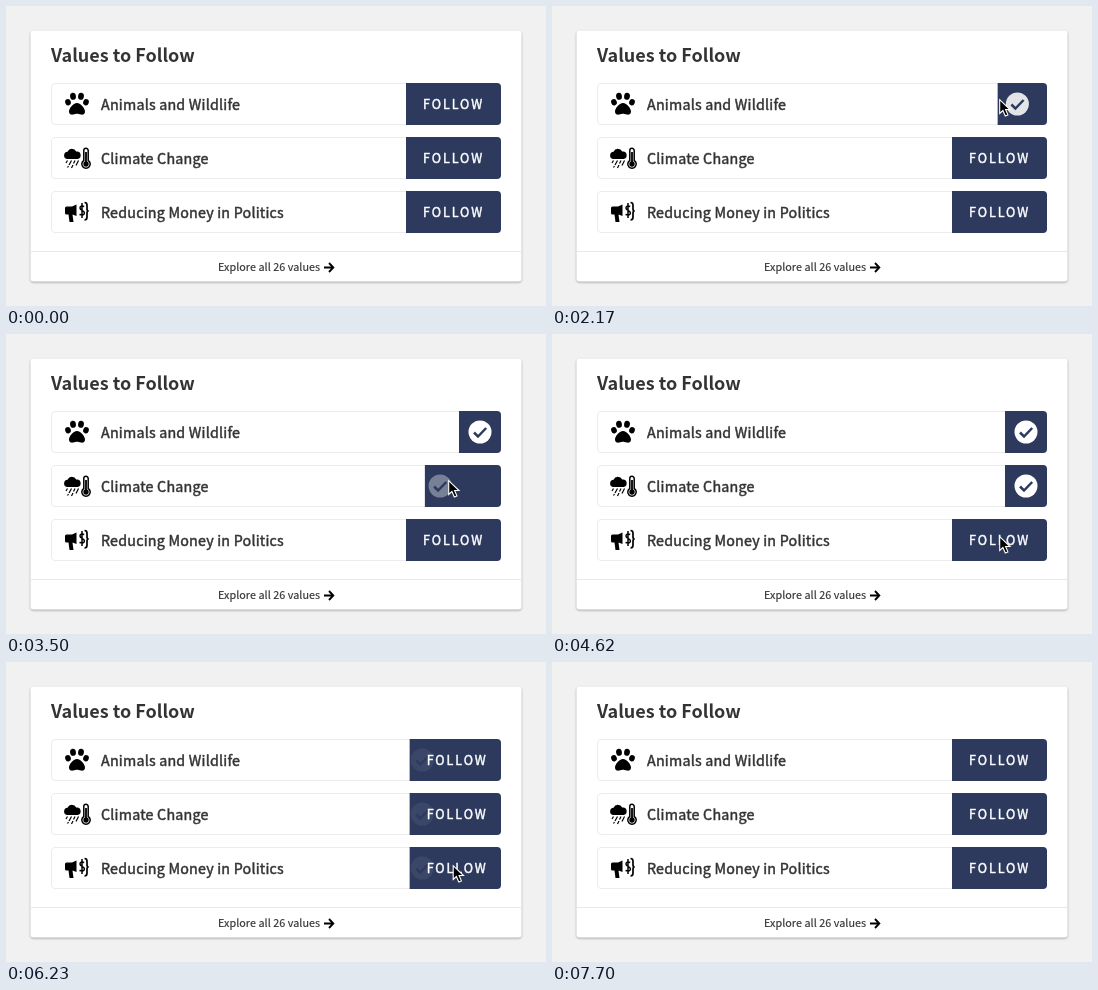
These frames come from a looping animation (540x300 px, 8.12 s). An HTML page:

```html
<!DOCTYPE html>
<html lang="en">
<head>
<meta charset="utf-8">
<title>Values to Follow</title>
<style>
html, body { margin: 0; width: 100%; height: 100%; overflow: hidden; background: #f1f1f1; }
svg { display: block; }
text { font-family: "Noto Sans CJK JP", "Noto Sans CJK SC", "Noto Sans CJK", "Open Sans", sans-serif; fill: #333; stroke: #333; stroke-width: 0; }
.title { font-size: 18px; font-weight: 700; }
/* a thin outline gives the semibold weight */
.name { font-size: 14.3px; letter-spacing: .2px; stroke-width: .45px; }
.label { font-size: 12.5px; letter-spacing: 1.95px; fill: #fff; stroke: #fff; stroke-width: .45px; }
.more { font-size: 10.8px; letter-spacing: .04px; stroke-width: .15px; }
.card { fill: #fff; filter: drop-shadow(0 1px 1px rgba(0, 0, 0, .3)); }
</style>
</head>
<body>
<svg width="540" height="300" viewBox="0 0 540 300">
  <defs>
    <clipPath id="row"><rect x="45" y="77" width="450" height="42" rx="4"/></clipPath>
    <g id="check">
      <circle r="11.5" fill="#fff"/>
      <path d="M-6 .5L-2 4.5L6.2 -4" fill="none" stroke="#2d3a5e" stroke-width="2.5"/>
    </g>
    <g id="icon0">
      <ellipse cx="-9" cy="-1.8" rx="2.8" ry="3.2" transform="rotate(-20 -9 -1.8)"/>
      <ellipse cx="-4" cy="-7.7" rx="2.9" ry="3.5" transform="rotate(-8 -4 -7.7)"/>
      <ellipse cx="4" cy="-7.7" rx="2.9" ry="3.5" transform="rotate(8 4 -7.7)"/>
      <ellipse cx="9" cy="-1.8" rx="2.8" ry="3.2" transform="rotate(20 9 -1.8)"/>
      <path d="M0-1C4-1 8 4.5 8 7.5C8 10 6 11 4 10.6C2 10.2 1 9.8 0 9.8S-2 10.2-4 10.6C-6 11-8 10-8 7.5C-8 4.500-4-1 0-1Z"/>
    </g>
    <g id="icon1">
      <path d="M-10 1A3.7 3.700 0 0 1-9.500-6.300A4.800 4.800 0 0 1-.800-6.500A3.800 3.800 0 0 1 .500 1Z"/>
      <path d="M-9.500 2.500l-1.500 2.500M-5.500 2.500l-2.500 4.500M-2 2.500l-1.500 3M1.500 2.500l-2.500 5M-8.500 8l-1 1.500M-4 7l-1.500 3" fill="none" stroke="#000" stroke-width="1.200"/>
      <path d="M6.800 2.500V-7.500a2.200 2.200 0 0 1 4.400 0V2.500a4.200 4.200 0 1 1-4.400 0Z" fill="#fff" stroke="#000" stroke-width="1.500"/>
      <path d="M9-6V5" stroke="#000" stroke-width="1.800"/>
      <circle cx="9" cy="6" r="2.700"/>
    </g>
    <g id="icon2">
      <path d="M-10.500-5.500H-5L-.5-7.500V4L-4.500 2.500L-3.500 10H-7.500L-8.500 2.500H-10.500Q-12 2.500-12 1V-4Q-12-5.500-10.500-5.500Z"/>
      <path d="M7.200-5.500Q3-7 3-4C3-1.300 7.400-2 7.400 1Q7.400 3.800 2.500 2.500M5-9V6" fill="none" stroke="#000" stroke-width="1.500"/>
      <path d="M7.500-9.500Q10-9.500 10-7V-3Q10-1 11.700-1Q10-1 10 1V5Q10 8 7.500 8" fill="none" stroke="#000" stroke-width="1.700"/>
    </g>
  </defs>
  <rect class="card" x="24.500" y="24.500" width="491" height="251" rx="3"/>
  <text class="title" x="45" y="56">Values to Follow</text>
  <g id="rows"></g>
  <path d="M24.500 245.500H515.500" stroke="#e8e8e8"/>
  <text class="more" x="212" y="265">Explore all 26 values</text>
  <path d="M318 261.500H327M323 257L327.300 261.500L323 266" fill="none" stroke="#000" stroke-width="1.900"/>
  <path id="cursor" d="M.7.7V14.500L3.900 11.500L6.300 17L8.900 15.900L6.600 10.500H11Z" stroke="#fff" stroke-width="1.100"/>
</svg>
<script>
const LOOP = 8120, STEP = 70, SLIDE = 300, RESET = 6026;
const items = [
  { name: 'Animals and Wildlife', followAt: 2000 },
  { name: 'Climate Change', followAt: 3432 },
  { name: 'Reducing Money in Politics', followAt: 4815 },
];
const clamp = u => Math.min(1, Math.max(0, u));
const easeIn = u => u * u;
const easeOut = u => 1 - (1 - u) ** 3;
const easeInOut = u => u * u * (3 - 2 * u);

// CSS "ease": cubic-bezier(.25, .1, .25, 1)
function ease(u) {
  let lo = 0, hi = 1;
  for (let i = 0; i < 20; i++) {
    const s = (lo + hi) / 2;
    const x = .75 * s * (1 - s) ** 2 + .75 * s * s * (1 - s) + s ** 3;
    if (x < u) lo = s; else hi = s;
  }
  return .3 * lo * (1 - lo) ** 2 + 3 * lo * lo * (1 - lo) + lo ** 3;
}

// start, end, target x, target y, easing
const moves = [
  [350, 1120, 452, 92, easeOut],
  [1120, 1330, 447, 93, easeInOut],
  [2450, 3290, 442, 146, easeInOut],
  [3920, 4480, 448, 201, easeInOut],
  [4550, 4620, 447, 202, easeInOut],
  [5600, 5670, 446.5, 203, easeInOut],
  [7070, 7630, 509, 9, easeIn],
];

document.getElementById('rows').innerHTML = items.map(({ name }, i) => `
  <g transform="translate(0 ${54 * i})">
    <rect x="45.500" y="77.500" width="449" height="41" rx="3.500" fill="#fff" stroke="#ececec"/>
    <use href="#icon${i}" x="71" y="98"/>
    <text class="name" x="95" y="104">${name}</text>
    <g clip-path="url(#row)">
      <g class="button">
        <rect x="400" y="77" width="95" height="42" fill="#2d3a5e"/>
        <text class="label" x="417" y="103">FOLLOW</text>
        <use class="tick" href="#check" y="98"/>
      </g>
    </g>
  </g>`).join('');
const buttons = [...document.querySelectorAll('.button')];
const cursor = document.getElementById('cursor');

function drawButton(button, t, followAt) {
  const p = t < RESET ? ease(clamp((t - followAt) / SLIDE)) : 1 - ease(clamp((t - RESET) / SLIDE));
  const tick = button.querySelector('.tick');
  button.setAttribute('transform', `translate(${53 * p} 0)`);
  button.querySelector('.label').style.opacity = t > followAt && t < RESET ? 0 : 1;
  tick.setAttribute('x', 412 + 9 * p);
  tick.style.opacity = p;
}

function drawCursor(t) {
  let x = 495, y = 28;
  for (const [start, end, toX, toY, curve] of moves) {
    if (t < start) break;
    const k = curve(Math.min(1, (t - start) / (end - start)));
    x += (toX - x) * k;
    y += (toY - y) * k;
  }
  cursor.setAttribute('transform', `translate(${x} ${y})`);
  cursor.style.display = t >= 350 && t < 7700 ? '' : 'none';
}

function draw(now) {
  const t = Math.floor(now % LOOP / STEP) * STEP;
  items.forEach((item, i) => drawButton(buttons[i], t, item.followAt));
  drawCursor(t);
  requestAnimationFrame(draw);
}
requestAnimationFrame(draw);
</script>
</body>
</html>
```
